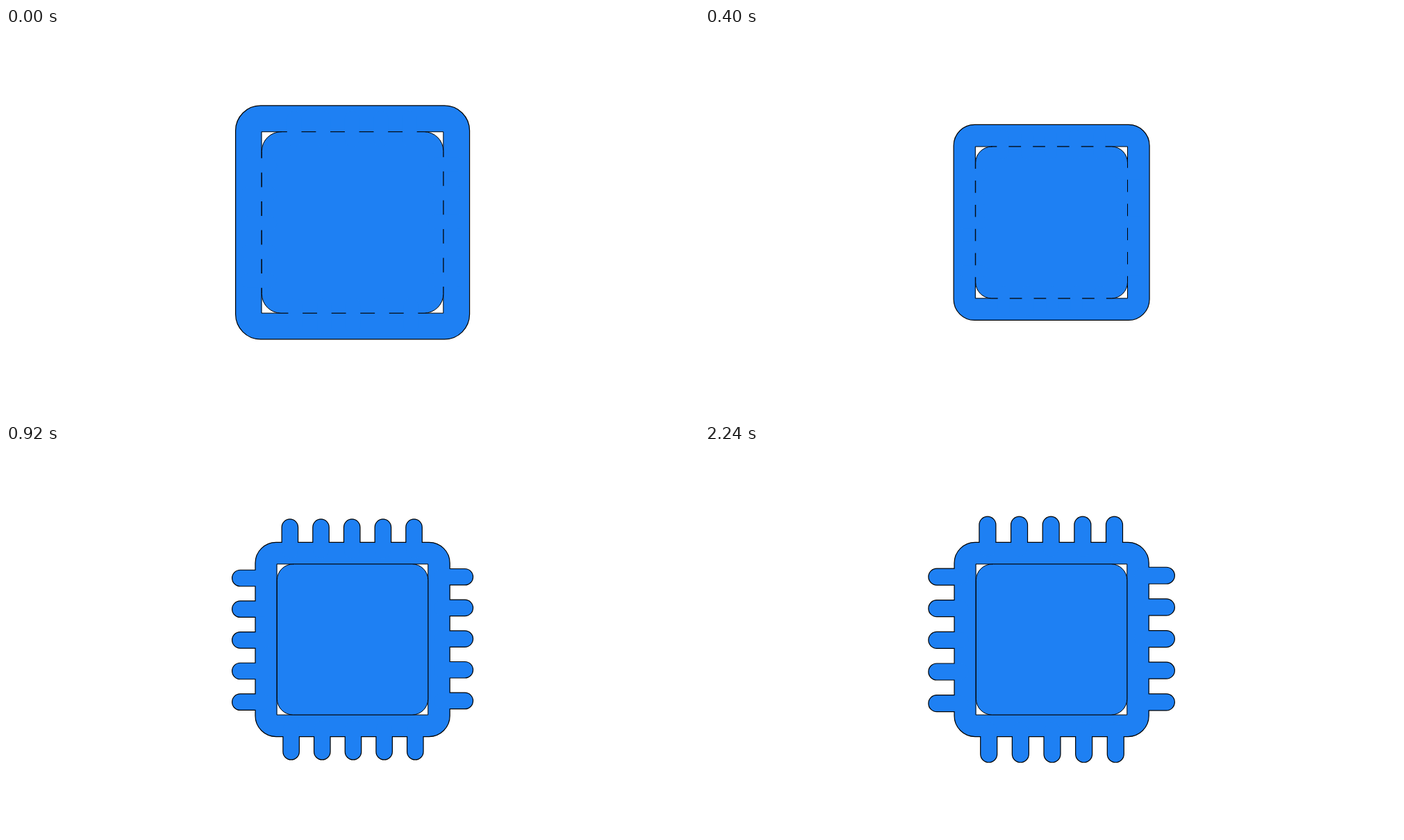
An HTML page with a canvas for the animation above (2280 ms loop, 998x561 px).

```html
<!DOCTYPE html>
<html lang="en">
<head>
<meta charset="utf-8">
<title>Chip</title>
<style>
  html, body { margin: 0; width: 100%; height: 100%; overflow: hidden; background: #fff; }
  canvas { display: block; }
</style>
</head>
<body>
<canvas id="stage" width="998" height="561"></canvas>
<script>
const ctx = document.getElementById('stage').getContext('2d');
const LOOP = 2280, STEP = 40, TAU = 105;
const BLUE = '#1e80f3', INK = '#000';
const CX = 499.1, CY = 280.45;

// Settled geometry, measured from the centre
const BODY = 140.1, CORNER = 30, HOLE = 108.7, CORE_CORNER = 23;
const PIN = { tip: 177.3, root: 119, width: 24, gap: 45.65, shift: -0.9 };

const START_SCALE = 168.5 / BODY;
const PIN_REST = 0.757;

const settle = (t, start) => t <= start ? 0 : 1 - Math.exp((start - t) / TAU);
const mix = (a, b, k) => a + (b - a) * k;

function square(half, radius) {
  ctx.beginPath();
  ctx.roundRect(-half, -half, half * 2, half * 2, radius);
}

function paint(fill, line) {
  ctx.fillStyle = fill;
  ctx.fill();
  ctx.strokeStyle = INK;
  ctx.lineWidth = line;
  ctx.stroke();
}

function pins(scale, color, grow) {
  const r = PIN.width / 2;
  ctx.strokeStyle = color;
  ctx.lineWidth = PIN.width * scale + grow;
  ctx.lineCap = 'round';
  for (let side = 0; side < 4; side++) {
    ctx.save();
    ctx.rotate(side * Math.PI / 2);
    ctx.beginPath();
    for (let i = -2; i <= 2; i++) {
      const x = (i * PIN.gap + PIN.shift) * scale;
      ctx.moveTo(x, -(PIN.root + r) * scale);
      ctx.lineTo(x, -(PIN.tip - r) * scale);
    }
    ctx.stroke();
    ctx.restore();
  }
}

function draw(t) {
  const body = mix(START_SCALE, 1, settle(t, 38));
  const pin = mix(PIN_REST * body, 1, settle(t, 665));

  ctx.setTransform(1, 0, 0, 1, 0, 0);
  ctx.fillStyle = '#fff';
  ctx.fillRect(0, 0, 998, 561);
  ctx.translate(CX, CY);

  pins(pin, INK, 1.2);
  square(BODY * body, CORNER * body);
  paint(BLUE, 1.2);
  square(HOLE * body, 0);
  paint('#fff', 1);
  square(HOLE * body, CORE_CORNER * body);
  paint(BLUE, 1);
  // Pin bodies hide the seam and the body outline beneath them
  pins(pin, BLUE, -1.2);
}

function tick() {
  const t = performance.now() % LOOP;
  draw(Math.floor(t / STEP) * STEP);
  requestAnimationFrame(tick);
}
tick();
</script>
</body>
</html>
```
